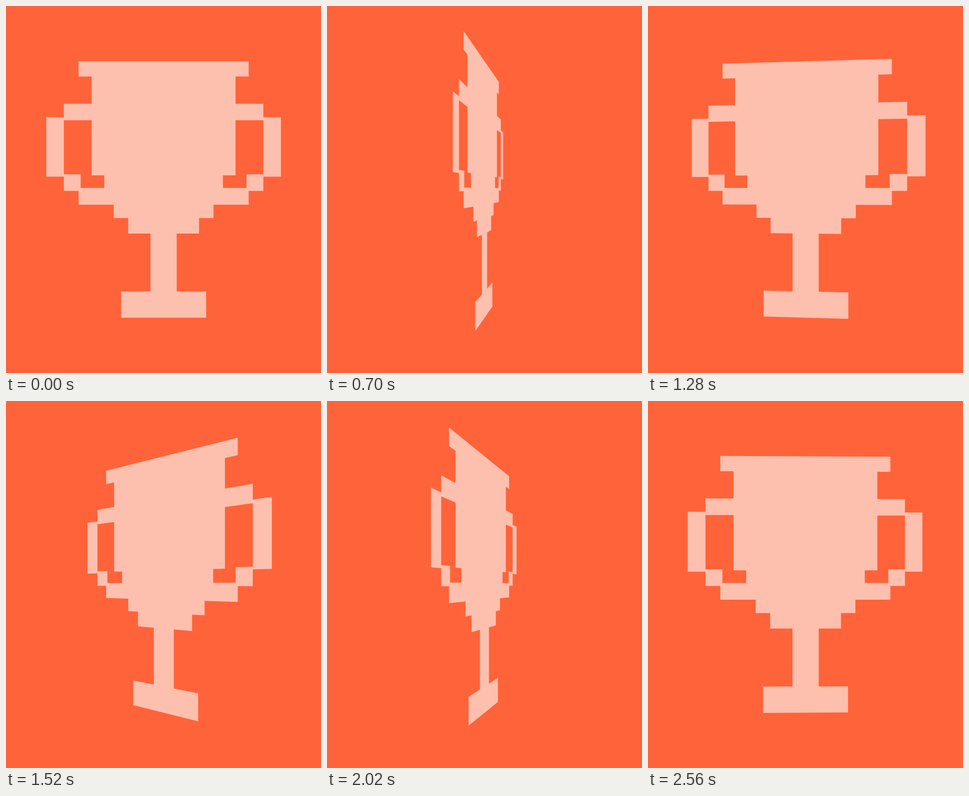
An HTML page with a canvas that plays this animation: 600x700 px, repeating every 2.58 s.

```html
<!DOCTYPE html>
<html>
<head>
<meta charset="utf-8">
<style>
  html, body { margin: 0; width: 600px; height: 700px; overflow: hidden; background: #ff6339; }
  canvas { display: block; }
</style>
</head>
<body>
<canvas id="stage" width="600" height="700"></canvas>
<script>
const ctx = document.getElementById('stage').getContext('2d');
const LOOP = 2580, STEP = 20, DEPTH = 830, CX = 300.2, CY = 350;
const SPEED = 0.145; // degrees per ms
const PAUSE = 1640;  // the turn rests here for one step

// Staircase outline: each x runs down from one y to the next.
const stairs = (xs, ys) => xs.flatMap((x, i) => [[x, ys[i]], [x, ys[i + 1]]]);
const mirror = points => points.map(([x, y]) => [-x, y]).reverse();

// Right half of the cup and its handle hole, measured from the centre.
const half = stairs(
  [162, 137, 190, 223.5, 190, 162, 95, 67.5, 25, 81],
  [-244.5, -215.5, -163.5, -138, -24.5, 2.7, 29, 54.5, 84, 194.5, 244.5]
);
const hole = stairs([190, 158, 113, 137], [-132, -29, -3, -27, -132]);
const shapes = [[...half, ...mirror(half)], hole, mirror(hole)];

// Steady turn that brakes sharply to complete 360 degrees.
function angleAt(time) {
  const moving = Math.min(time, PAUSE) + Math.max(0, time - PAUSE - STEP);
  const excess = SPEED * (LOOP - STEP) - 360;
  return (SPEED * moving - excess * (time / LOOP) ** 24) * Math.PI / 180;
}

function draw(time) {
  const angle = angleAt(time), cos = Math.cos(angle), sin = Math.sin(angle);
  const cup = new Path2D();
  for (const shape of shapes) {
    shape.forEach(([x, y], i) => {
      const scale = DEPTH / (DEPTH - x * sin);
      cup[i ? 'lineTo' : 'moveTo'](CX + x * cos * scale, CY + y * scale);
    });
    cup.closePath();
  }
  ctx.fillStyle = '#ff6339';
  ctx.fillRect(0, 0, 600, 700);
  ctx.fillStyle = '#fdbfae';
  ctx.fill(cup, 'evenodd');
}

const start = performance.now();
function frame() {
  const elapsed = (performance.now() - start) % LOOP;
  draw(Math.floor(elapsed / STEP) * STEP);
  requestAnimationFrame(frame);
}
frame();
</script>
</body>
</html>
```
